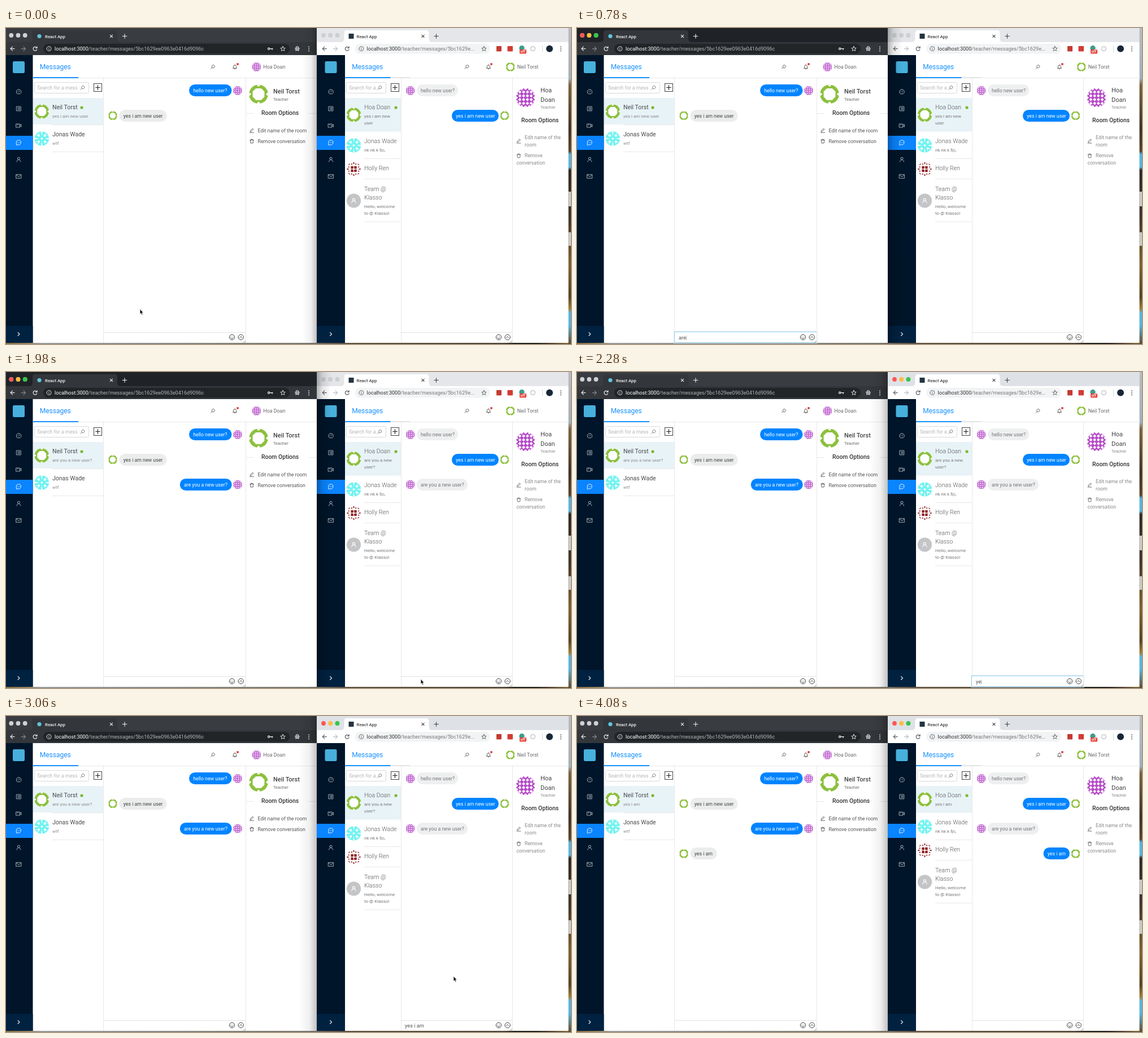
Recreate the animation shown at these times as an HTML page. Size 1000x560 px, loop 4.14 s.

```html
<!DOCTYPE html>
<html lang="en">
<head>
<meta charset="utf-8">
<title>Two chat windows</title>
<style>
html, body { margin: 0; width: 100%; height: 100%; overflow: hidden; background: #fff; }
svg { display: block; }
#stage { width: 1000px; height: 560px; }
text { font-family: Roboto, Arial, sans-serif; white-space: pre; }
</style>
</head>
<body>
<svg id="stage" viewBox="0 0 1000 560" xmlns="http://www.w3.org/2000/svg">
<defs>
  <clipPath id="disc"><circle r="10"/></clipPath>
  <linearGradient id="shadeR"><stop offset="0" stop-opacity=".3"/><stop offset=".4" stop-opacity=".1"/><stop offset="1" stop-opacity="0"/></linearGradient>
  <linearGradient id="shadeL"><stop offset="0" stop-opacity="0"/><stop offset=".6" stop-opacity=".06"/><stop offset="1" stop-opacity=".24"/></linearGradient>
  <linearGradient id="photo" x2="0" y2="1">
    <stop offset="0" stop-color="#b9bcc0"/><stop offset=".16" stop-color="#9fb0bd"/>
    <stop offset=".18" stop-color="#7a6238"/><stop offset=".32" stop-color="#3c3024"/>
    <stop offset=".39" stop-color="#5a4326"/><stop offset=".4" stop-color="#55b5e0"/>
    <stop offset=".44" stop-color="#55b5e0"/><stop offset=".45" stop-color="#2e2720"/>
    <stop offset=".6" stop-color="#40352a"/><stop offset=".75" stop-color="#80602c"/>
    <stop offset=".85" stop-color="#54401f"/><stop offset=".89" stop-color="#a37f35"/>
    <stop offset=".9" stop-color="#55b5e0"/><stop offset=".94" stop-color="#55b5e0"/>
    <stop offset="1" stop-color="#5f4a28"/>
  </linearGradient>
  <linearGradient id="floor"><stop offset="0" stop-color="#8a6c3c"/><stop offset=".04" stop-color="#9a8560"/><stop offset=".06" stop-color="#9b9b9b"/><stop offset=".53" stop-color="#77736b"/><stop offset=".6" stop-color="#5c503c"/><stop offset=".88" stop-color="#4a4030"/><stop offset=".9" stop-color="#211e1a"/><stop offset=".94" stop-color="#211e1a"/><stop offset="1" stop-color="#8a6c3c"/></linearGradient>
</defs>
</svg>
<script>
const LOOP = 4140, STEP = 60;
const ANH = 'Hoa Doan', BILL = 'Neil Torst', JAMES = 'Jonas Wade', EMILY = 'Holly Ren';
const ASK = 'are you a new user?', REPLY = 'yes i am', FIRST = 'yes i am new user';
const LEFT_ON = 540, SENT = 1680, RIGHT_ON = 2100, DONE = 3600;

// Drawing helpers, each returns markup
const rect = (x, y, w, h, fill, more = '') =>
  `<rect x="${x}" y="${y}" width="${w}" height="${h}" fill="${fill}" ${more}/>`;
const circ = (x, y, r, fill, more = '') => `<circle cx="${x}" cy="${y}" r="${r}" fill="${fill}" ${more}/>`;
const text = (x, y, size, s, fill = '#4a4a4a', more = '') =>
  `<text x="${x}" y="${y}" font-size="${size}" fill="${fill}" ${more}>${s}</text>`;
const icon = (x, y, d, color, width = .9) =>
  `<path transform="translate(${x} ${y})" d="${d}" fill="none" stroke="${color}" stroke-width="${width}" stroke-linecap="round" stroke-linejoin="round"/>`;
const hline = (x, y, w, color = '#e8e8e8') => rect(x, y, w, 1, color);
const vline = (x, y, h, color = '#e8e8e8') => rect(x, y, 1, h, color);
const during = (from, to, s) => `<g data-from="${from}" data-to="${to}">${s}</g>`;
const LIGHT = 'font-weight="300"', MEDIUM = 'font-weight="500"';
const around = (n, s) => Array.from({ length: n }, (_, i) => `<g transform="rotate(${i * 360 / n})">${s}</g>`).join('');
const ring = r => `M${-r} 0A${r} ${r} 0 1 1 ${r} 0A${r} ${r} 0 1 1 ${-r} 0`;

const ICON = {
  back: 'M3.5 0H-3.5M0 -3.5L-3.5 0L0 3.5',
  forward: 'M-3.5 0H3.5M0 -3.5L3.5 0L0 3.5',
  reload: 'M3 -1.5A3.4 3.4 0 1 0 3.2 1.3M3.4 -3.8V-1.2H.8',
  info: ring(4) + 'M0 -.3V2M0 -2V-1.9',
  star: 'M0 -4.2L1.2 -1.3L4.2 -1.1L1.9 .9L2.6 3.9L0 2.3L-2.6 3.9L-1.9 .9L-4.2 -1.1L-1.2 -1.3Z',
  close: 'M-2.2 -2.2L2.2 2.2M2.2 -2.2L-2.2 2.2',
  plus: 'M-3.8 0H3.8M0 -3.8V3.8',
  find: 'M-.6 .9A2.6 2.6 0 1 1 .2 1.5A2.6 2.6 0 0 1 -.6 .9L-3 3.3',
  bell: 'M-3.5 2.3H3.5M-2.6 2.3V-.6A2.6 2.6 0 0 1 2.6 -.6V2.3M-.8 3.6H.8M0 -3.2V-4',
  gauge: 'M-2.8 3.4A4.3 4.3 0 1 1 2.8 3.4ZM0 .8L1.7 -1.2M-2.6 0H-2.3M0 -2.5V-2.4',
  list: 'M-3.8 -3.8H3.8V3.8H-3.8ZM-1.9 -1.7H-1.8M-.4 -1.7H2M-1.9 0H-1.8M-.4 0H2M-1.9 1.7H-1.8M-.4 1.7H2',
  video: 'M-4.5 -3H1.8V3H-4.5ZM1.8 -.8L4.5 -2.2V2.2L1.8 .8M-2.8 -1.3H-1.2',
  chat: 'M-4.2 4V0A4.1 4.1 0 1 1 0 4ZM-1.9 0H-1.8M0 0H.1M1.9 0H2',
  user: 'M-2.1 -1.8A2.1 2.1 0 1 1 2.1 -1.8A2.1 2.1 0 1 1 -2.1 -1.8M-3.6 4C-3.4 -.6 3.4 -.6 3.6 4',
  mail: 'M-4.4 -3.3H4.4V3.3H-4.4ZM-4.2 -2.6L0 .7L4.2 -2.6',
  open: 'M-1.5 -2.8L1.5 0L-1.5 2.8',
  smile: ring(4.7) + 'M-1.8 -1.3H-1.7M1.7 -1.3H1.8M-2.2 .8A2.3 2.3 0 0 0 2.2 .8',
  send: ring(4.7) + 'M-2.2 1L0 -1.3L2.2 1',
  pen: 'M-3.5 3.6H3.5M-2.7 1.8L-2.4 0L1.6 -3.6L3 -2.2L-1 1.5Z',
  bin: 'M-3.3 -2H3.3M-1.3 -2V-3.3H1.3V-2M-2.5 -2L-2.2 3.5H2.2L2.5 -2'
};

const GREEN = '#8cc03c', PURPLE = '#b64cc8', CYAN = '#6ff3f0', RED = '#8f1d20';
const diamonds = [-6, -2, 2, 6].flatMap(x => [-6, -2, 2, 6].map(y =>
  `<path d="M${x} ${y - 1.7}l1.7 1.7l-1.7 1.7l-1.7 -1.7z" fill="#fff"/>`)).join('');
const FACE = {
  green: rect(-10, -10, 20, 20, GREEN) +
    '<path d="M-2.8 -6.2H2.8L6.2 -2.8V2.8L2.8 6.2H-2.8L-6.2 2.8V-2.8Z" fill="#fff"/>' +
    around(4, '<path d="M-2.2 -10.2L0 -7.6L2.2 -10.2Z" fill="#fff"/>'),
  purple: rect(-10, -10, 20, 20, PURPLE) + diamonds +
    around(4, '<path d="M-2 -10L0 -8L2 -10Z M-5.7 -9.4L-4 -7.6L-2.3 -9.4Z M2.3 -9.4L4 -7.6L5.7 -9.4Z" fill="#fff"/>'),
  cyan: rect(-10, -10, 20, 20, CYAN) +
    around(4, '<path d="M0 -3.5L-1 -10H1.2Z M-2 -3L-5 -9L-4 -4.5L-8 -6Z M2 -4L5.8 -7.8L4.6 -3.4Z" fill="#fff"/>') +
    '<path d="M0 -1.8L1.8 0L0 1.8L-1.8 0Z" fill="#fff"/>',
  red: rect(-10, -10, 20, 20, '#fff') +
    around(4, rect(.5, -4, 3.5, 3.5, RED) + rect(-3.6, -7.6, 1.5, 1.5, RED) + rect(2.1, -7.6, 1.5, 1.5, RED) +
      rect(-.7, -9.6, 1.4, 2.6, RED) + '<path d="M5.2 -8.2L8.2 -5.2L5.8 -5.8Z" fill="#8f1d20"/>') +
    circ(0, 0, 1.2, '#fff')
};
const face = (kind, x, y, r) =>
  `<g transform="translate(${x} ${y}) scale(${r / 10})"><g clip-path="url(#disc)">${FACE[kind]}</g></g>`;

function bubble(x, y, w, s, mine, soft) {
  return rect(x, y, w, 21, mine ? '#0084ff' : soft ? '#eeeff0' : '#ebecec', 'rx="10.5"') +
    text(x + 7.2, y + 13.9, 8.77, s, mine ? '#fff' : soft ? '#777' : '#444');
}

function lights(x, on, off, from, to) {
  const row = colors => colors.map((c, i) => circ(x + i * 12.2, 13, 3.9, c)).join('');
  return row([off, off, off]) + during(from, to, row(on));
}

function tab(x, dark) {
  const bg = dark ? '#33363a' : '#fff', ink = dark ? '#f0f0f0' : '#444';
  return `<path d="M${x - 6} 25Q${x} 25 ${x} 19V9Q${x} 4 ${x + 5} 4H${x + 145}Q${x + 150} 4 ${x + 150} 9V19Q${x + 150} 25 ${x + 156} 25Z" fill="${bg}"/>` +
    (dark ? circ(x + 12, 14.5, 3.6, '#5fc4de') : rect(x + 8, 10, 9, 9, '#24343f')) +
    text(x + 22, 17.7, 7.85, 'React App', ink, MEDIUM) +
    icon(x + 139.5, 14.5, ICON.close, ink, 1.1) + icon(x + 163, 14.5, ICON.plus, ink, 1.1);
}

const dots = (x, color) => [33.5, 37, 40.5].map(y => circ(x, y, 1, color)).join('');

function sidebar(x, w, cx) {
  const marks = ['gauge', 'list', 'video', 'chat', 'user', 'mail'];
  return rect(x, 48, w, 510, '#001529') + rect(x, 191, w, 25, '#0a84ff') + rect(x, 528, w, 30, '#002140') +
    rect(cx - 10.5, 59, 21, 21, '#48b0dc', 'rx="2.5"') +
    marks.map((m, i) => icon(cx, 113 + i * 30, ICON[m], m === 'chat' ? '#fff' : '#b4bbc3')).join('') +
    icon(cx, 542.5, ICON.open, '#fff', 1.1);
}

function header(x, w, find, bell, kind, fx, name) {
  return hline(x, 88, w) + rect(x, 87, 80.5, 2, '#1890ff') + text(x + 12.2, 73, 12, 'Messages', '#1890ff') +
    icon(find, 69, ICON.find, '#555') + icon(bell, 69, ICON.bell, '#555') + circ(bell + 5, 64, 2, '#e0393e') +
    face(kind, fx, 69, 8) + text(fx + 12, 72.3, 8.9, name, '#666');
}

function search(x, w, hint) {
  return rect(x + .5, 96.5, w, 19, '#fff', 'rx="2" stroke="#d9d9d9"') +
    `<svg x="${x}" y="96" width="${w - 18}" height="20">${text(5, 13.3, 8.9, hint, '#b5b5b5')}</svg>` +
    icon(x + w - 11, 106, ICON.find, '#777', 1) +
    rect(x + w + 9.5, 98.5, 14, 14, '#fff', 'stroke="#444"') +
    icon(x + w + 16.5, 105.5, ICON.plus, '#222', 1.2);
}

function inputBar(x, w, on, off, id) {
  return hline(x, 539, w, '#e2e2e2') +
    during(on, off, rect(x, 538.5, w, 19, '#fff', 'stroke="#e0f1fb" stroke-width="2.5"') +
      rect(x, 538.5, w, 19, '#fff', 'stroke="#94cbe8"')) +
    text(x + 7.5, 551.5, 9.2, '', '#555', `id="${id}"`) +
    icon(x + w - 24.5, 548, ICON.smile, '#444', 1) + icon(x + w - 8.8, 548, ICON.send, '#444', 1) +
    icon(x + w - 2.5, 555.5, 'M-2 2L2 -2M0 2L2 0', '#888', .7);
}

function leftWindow() {
  const ink = '#e8eaed', sub = '#8a8a8a';
  const last = s => text(82, 158.7, 8, s, sub);
  return rect(0, 0, 550, 25, '#393c40') + during(LEFT_ON, RIGHT_ON, rect(0, 0, 550, 25, '#1f2327')) +
    lights(9.3, ['#fc5753', '#fdbc40', '#33c748'], '#d0d2d4', LEFT_ON, RIGHT_ON) +
    rect(0, 25, 550, 23, '#33363a') + tab(47, true) +
    rect(66, 28, 436, 17.5, '#222528', 'rx="8.7"') +
    icon(11.5, 36.7, ICON.back, ink, 1.2) + icon(31, 36.7, ICON.forward, '#85888c', 1.2) +
    icon(51.5, 36.7, ICON.reload, ink, 1.2) + icon(76, 36.7, ICON.info, ink) +
    text(86, 39.8, 9.1, 'localhost:3000<tspan fill="#b0b3b7">/teacher/messages/5bc1629ee0963e0416d9096c</tspan>', '#fff') +
    icon(467, 36.7, 'M-3.4 0A1.6 1.6 0 1 1 -.2 0A1.6 1.6 0 1 1 -3.4 0M0 0H5M4 0V1.7', ink, 1.3) +
    icon(490, 36.7, ICON.star, ink) +
    icon(515.5, 36.7, 'M-4 -.8H4M-2 -1L-1.5 -3.7H1.5L2 -1M-3 2A1.2 1.2 0 1 1 -.6 2A1.2 1.2 0 1 1 -3 2M.6 2A1.2 1.2 0 1 1 3 2A1.2 1.2 0 1 1 .6 2', ink, 1.1) +
    dots(536, ink) +
    rect(47, 48, 503, 510, '#fff') + sidebar(0, 47.5, 22.5) +
    header(47.5, 502.5, 365.5, 405, 'purple', 443.3, ANH) +
    search(50, 96, 'Search for a mess') +
    rect(48, 124, 124, 47, '#e8f3f7') + vline(172, 89, 469) +
    face('green', 63.3, 148, 12.8) + text(82, 144.2, 10.5, BILL) + circ(134, 141, 2.6, '#79b82e') +
    during(0, SENT, last(FIRST)) + during(SENT, DONE, last(ASK)) + during(DONE, LOOP, last(REPLY)) +
    hline(82, 171, 90) + face('cyan', 63.3, 196, 12.8) + text(82, 192.2, 10.5, JAMES) + text(82, 206.5, 8, 'wtf', sub) +
    hline(82, 219, 90) +
    bubble(324, 100, 75.5, 'hello new user?', true) + face('purple', 410, 111, 8) +
    bubble(200.5, 145, 84, FIRST) + face('green', 189, 155.3, 8) +
    during(SENT, LOOP, bubble(307.7, 189, 92, ASK, true) + face('purple', 410, 199.5, 8)) +
    during(DONE, LOOP, bubble(200.5, 233, 47.5, REPLY) + face('green', 189, 244, 8)) +
    inputBar(172.5, 252, LEFT_ON, 1620, 'ask') +
    vline(424, 89, 469) +
    face('green', 447, 117.3, 16.8) + text(473, 116.3, 11, BILL, '#444', MEDIUM) + text(473, 128.7, 7.5, 'Teacher', '#666') +
    hline(424, 151, 14) + hline(535, 151, 15) + text(452, 154.3, 10.4, 'Room Options', '#333', MEDIUM) +
    icon(435, 181.7, ICON.pen, '#555') + text(445.5, 184.5, 8.8, 'Edit name of the room', '#555') +
    icon(435, 200.5, ICON.bin, '#555') + text(445.5, 203.7, 8.8, 'Remove conversation', '#555');
}

function contacts() {
  return face('cyan', 615.5, 208, 12.8) + text(634, 204.2, 10.6, JAMES, '#555', LIGHT) +
    text(634, 218.5, 8, 'nk nk k fjc,', '#777') + hline(634, 231, 65) +
    face('red', 615.5, 250, 12.8) + text(634, 252.3, 10.6, EMILY, '#555', LIGHT) + hline(634, 267, 65) +
    circ(615.5, 306, 12.6, '#c3c5c7') + icon(615.5, 306, ICON.user, '#fff', 1.1) +
    text(634, 288.7, 10.6, 'Team @', '#555', LIGHT) + text(634, 304.3, 10.6, 'Klasso', '#555', LIGHT) +
    text(634, 319, 8, 'Hello, welcome', '#777') + text(634, 330.8, 8, 'to @ Klasso!', '#777') + hline(634, 343, 65);
}

function rightWindow() {
  const ink = '#5a5d61', soft = '#888';
  const [given, family] = ANH.split(' ');
  const active = (h, lines) => rect(600, 124, 99, h, '#e8f3f7') + face('green', 615.5, 124 + h / 2, 12.8) +
    lines.map((s, i) => text(634, 158.7 + i * 11.8, 8, s, '#777')).join('');
  return rect(550, 0, 445.5, 25, '#e4e6ea') + during(RIGHT_ON, LOOP, rect(550, 0, 445.5, 25, '#dee1e6')) +
    lights(562, ['#fc5753', '#fdbc40', '#33c748'], '#cccfd2', RIGHT_ON, LOOP) +
    rect(550, 25, 445.5, 23, '#fff') + tab(598.5, false) +
    rect(618, 28, 239, 17.5, '#f1f3f4', 'rx="8.7"') +
    icon(563.7, 36.7, ICON.back, ink, 1.2) + icon(583, 36.7, ICON.forward, '#b9bcbf', 1.2) +
    icon(603.7, 36.7, ICON.reload, ink, 1.2) + icon(628.8, 36.7, ICON.info, ink) +
    text(638.5, 39.8, 9.1, 'localhost:3000<tspan fill="#777">/teacher/messages/5bc1629e...</tspan>', '#333') +
    icon(846, 36.7, ICON.star, ink) +
    rect(868, 32, 9, 9.5, '#c23b32', 'rx="1"') + rect(887.5, 32, 9.5, 9.5, '#d23c35', 'rx="1"') +
    circ(913, 35.7, 4.7, '#3d9c8c') + rect(909, 38, 12, 7.5, '#e23b31', 'rx="1.5"') +
    text(910.3, 44.1, 7, 'off', '#fff', MEDIUM) +
    circ(932.5, 36.7, 4, '#fff', 'stroke="#aaa"') + vline(949, 31, 12, '#d5d7da') +
    circ(962, 36.7, 6, '#182636') + dots(982, ink) +
    rect(599, 48, 396.5, 510, '#fff') + sidebar(550, 50, 575) +
    header(600, 395.5, 815, 854, 'green', 892.7, BILL) + rect(681, 87, 34, 1.5, '#dfe2e5') +
    search(602, 70, 'Search for a mess') +
    during(0, SENT, active(59.5, ['yes i am new', 'user'])) +
    during(SENT, DONE, active(59.5, ['are you a new', 'user?'])) +
    during(DONE, LOOP, active(47.5, [REPLY])) +
    text(634, 144.2, 10.6, ANH, '#555', LIGHT) + circ(690, 141, 2.6, '#79b82e') +
    `<g id="contacts">${contacts()}</g>` + vline(699, 89, 469) +
    bubble(726.7, 100, 73.5, 'hello new user?', false, true) + face('purple', 715.7, 111, 8) +
    bubble(789, 145, 83, FIRST, true) + face('green', 882.5, 155.3, 8) +
    during(SENT, LOOP, bubble(726.7, 189, 90.5, ASK, false, true) + face('purple', 715.7, 199.5, 8)) +
    during(DONE, LOOP, bubble(825.5, 233, 46.5, REPLY, true) + face('green', 882.5, 244, 8)) +
    inputBar(698.5, 198, RIGHT_ON, 2760, 'reply') +
    vline(896, 89, 469) +
    face('purple', 919.5, 123.5, 16.8) + text(946, 114.3, 11, given, '#444') + text(946, 130.6, 11, family, '#444') +
    text(946, 143.2, 7.4, 'Teacher', soft) + text(912, 167.2, 10.4, 'Room Options', '#333', MEDIUM) +
    icon(907.5, 200.5, ICON.pen, '#666') + text(918, 197, 8.8, 'Edit name of the', soft) + text(918, 210, 8.8, 'room', soft) +
    icon(907.5, 226.3, ICON.bin, '#666') + text(918, 229.3, 8.8, 'Remove', soft) + text(903.5, 242.2, 8.8, 'conversation', soft);
}

const stage = document.getElementById('stage');
stage.insertAdjacentHTML('beforeend',
  rect(0, 556, 1000, 4, 'url(#floor)') + rect(995, 0, 5, 560, 'url(#photo)') +
  rect(995.5, 290, 4.5, 26, '#c9c9c6') + rect(995.5, 362, 4.5, 24, '#c9c9c6') +
  leftWindow() + during(0, LEFT_ON, rect(524, 0, 26, 558, 'url(#shadeL)')) +
  during(RIGHT_ON, LOOP, rect(518, 0, 32, 558, 'url(#shadeL)')) +
  rightWindow() + during(LEFT_ON, RIGHT_ON, rect(550, 0, 26, 558, 'url(#shadeR)')) +
  '<path id="pointer" d="M0 0V9.2L2 7.4L3.4 10.6L5 9.9L3.6 6.8H6.3Z" fill="#111" stroke="#fff" stroke-width=".8"/>');

const find = id => document.getElementById(id);
const timed = [...document.querySelectorAll('[data-from]')].map(el => ({ el, from: +el.dataset.from, to: +el.dataset.to }));
const ask = find('ask'), reply = find('reply'), pointer = find('pointer'), people = find('contacts');

// Pointer tip: time, x, y
const PATH = [
  [0, 237, 498], [480, 262, 545], [1320, 290, 545], [1500, 413, 536], [1560, 415, 545], [1680, 415, 545],
  [1980, 734, 544], [2760, 734, 544], [3060, 792, 461], [3480, 887, 545], [3600, 887, 545], [3900, 880, 562], [LOOP, 880, 562]
];
const ease = k => k * k * (3 - 2 * k);

function place(t) {
  const i = PATH.findIndex(p => p[0] > t);
  const [t0, x0, y0] = PATH[i - 1], [t1, x1, y1] = PATH[i];
  const k = ease((t - t0) / (t1 - t0));
  return [x0 + (x1 - x0) * k, y0 + (y1 - y0) * k];
}

function type(el, s, t, start, pace, end) {
  const n = Math.max(0, Math.min(s.length, Math.floor((t - start) / pace)));
  const caret = n < s.length && t >= start ? '<tspan font-weight="300" dx="-.6">|</tspan>' : '';
  el.innerHTML = t < end ? s.slice(0, n) + caret : '';
}

function draw(t) {
  for (const { el, from, to } of timed) el.style.display = t >= from && t < to ? '' : 'none';
  type(ask, ASK, t, 684, 32, 1620);
  type(reply, REPLY, t, 2160, 60, DONE);
  people.setAttribute('transform', `translate(0 ${t < DONE ? 0 : -12})`);
  pointer.setAttribute('transform', `translate(${place(t)})`);
  const typing = t >= 660 && t < 1320 || t >= 2160 && t < 2760;
  pointer.style.display = typing ? 'none' : '';
}

const start = performance.now();
function tick() {
  const t = (performance.now() - start) % LOOP;
  draw(Math.floor(t / STEP) * STEP);
  requestAnimationFrame(tick);
}
tick();
</script>
</body>
</html>
```
